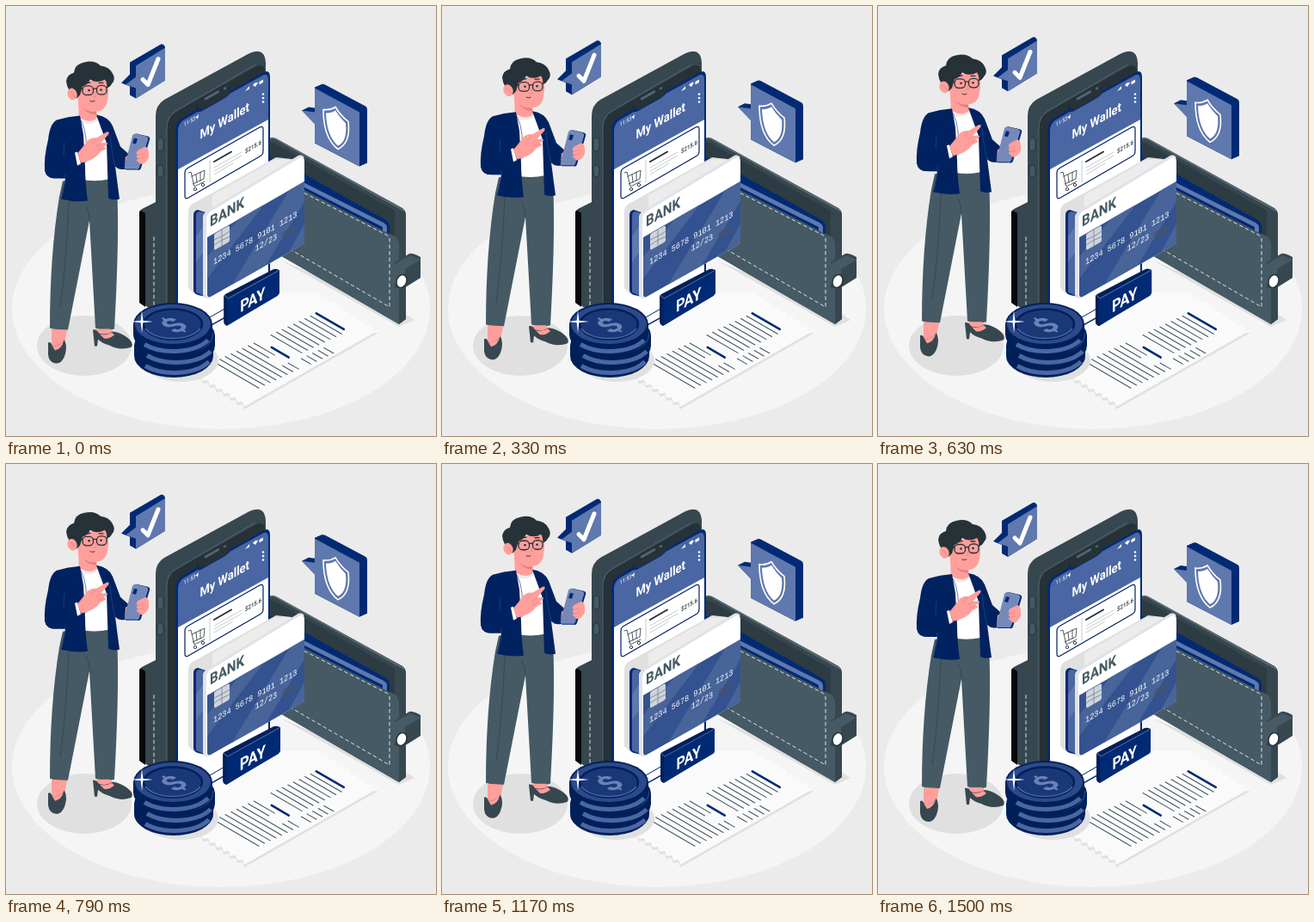
Write an HTML page that moves like this. It is 500 by 500 pixels and loops after 1540 ms.

```html
<!DOCTYPE html>
<html lang="en">
<head>
<meta charset="utf-8">
<title>My Wallet</title>
<style>
html, body { margin: 0; width: 100%; height: 100%; overflow: hidden; background: #ebebeb; }
svg { display: block; width: 100vw; height: 100vh; }
text { font-family: Roboto, sans-serif; font-weight: 700; fill: #fff; }
.mono { font: 9.9px "Liberation Mono", monospace; }
.navy { fill: #012a74; } .deep { fill: #01205a; } .blue { fill: #5f78ae; } .mid { fill: #4a66a3; }
.dark { fill: #263238; } .slate { fill: #37474f; } .steel { fill: #455a64; } .skin { fill: #ff9f9b; }
.white { fill: #fff; } .shade { fill: #e0e0e0; } .jacket { fill: #012260; }
.line { fill: none; stroke: #263238; stroke-linecap: round; stroke-linejoin: round; }
.stitch { fill: none; stroke: #dfe4e6; stroke-dasharray: 4.5 3; }
</style>
</head>
<body>
<svg viewBox="0 0 500 500">
  <defs>
    <clipPath id="cardArt"><path d="M234 269L347 204V273Q347 276 344 278L238 338Q234 340 234 335Z"/></clipPath>
    <g id="coin">
      <path class="deep" d="M-46 0V12A46 25 0 0 0 46 12V0Z"/>
      <path d="M-33 23.500A46 25 0 0 0 41 18.500" fill="none" stroke="#4a66a3" stroke-width="5"/>
      <ellipse rx="46" ry="25" class="deep"/>
      <ellipse rx="44" ry="23" fill="#2c4a8a"/>
    </g>
    <path id="paper" d="M277 466l-2-6-6 1-2-6-6 1-2-6-6 1-2-6-6 1-2-6-6 1-2-6-6 1-2-6-6 1L205 390 306 333 365 333l2.500 6 6-.5 2.500 6 6-.5 2.500 6 6-.5 2.500 6 6-.5 2.500 6 6-.5 2.500 6 6-.5 2.500 6 6-.5 2.500 6 6-.5Z"/>
  </defs>

  <ellipse cx="250" cy="352" rx="243" ry="140" fill="#f5f5f5"/>
  <ellipse class="shade" cx="91" cy="395" rx="55" ry="35"/>
  <path class="shade" d="M320 296L457 373L475 365L460 355Z"/>

  <g id="wallet">
    <path class="slate" d="M155 241Q155 237 160 235L178 226V356L164 350L155 342Z"/>
    <path d="M155 241Q155 236 159 239L162 241V350L155 345Z" fill="#05090b"/>
    <path class="stitch" d="M178 264L172 268V352"/>
    <path class="slate" d="M300 160Q306 151 314 154L461 235Q465 238 465 243V364L457 370L300 279Z"/>
    <path d="M300 163Q308 156 315 161L452 238V275L300 200Z" fill="#2d3b42"/>
    <path d="M304 156Q309 151 316 156L463 238" fill="none" stroke="#5a6d76" stroke-width="1.500"/>
    <path class="navy" d="M300 176L316 178L440 248Q446 251 446 256V272L300 200Z"/>
    <path class="blue" d="M300 182L439 252Q443 254 443 258V266L300 194Z"/>
    <path class="navy" d="M300 187L438 257V264L300 194Z"/>
    <path class="steel" d="M300 190L446 265Q457 268 457 277V370L300 279Z"/>
    <path class="slate" d="M452 239L464 240Q465 241 465 245V364L457 370V274L452 267Z"/>
    <path class="stitch" d="M340 214L442 266Q446 268 446 272V350L315 274"/>
    <path class="slate" d="M452 298L469 288Q473 287 482 292V316L463 328H452Z"/>
    <path class="steel" d="M452 300L470 290L482 295L464 306V318L452 323Z"/>
    <g transform="rotate(20 460 320)">
      <ellipse cx="460" cy="320" rx="6.500" ry="8.500" class="dark"/>
      <ellipse cx="460" cy="320" rx="5" ry="7" class="white"/>
    </g>
  </g>

  <use href="#paper" y="3" class="shade"/>
  <use href="#paper" fill="#fafafa"/>
  <g id="receipt" class="line"></g>

  <g id="phone">
    <path class="slate" d="M174 128Q174 115 184 109L283 55Q301 47 302 66V95L200 380L174 362Z"/>
    <path class="dark" d="M187 142Q187 129 197 123L291 70Q301 66 301 78V330L200 390L187 376Z"/>
    <path d="M187 360V142Q187 128 198 122L290 68" fill="none" stroke="#4c5f69" stroke-width="1.200"/>
    <path d="M176 156q3-6 7 0v10q-4 6-7 0zM176 188q3-6 7 0v8q-4 6-7 0z" fill="#455a64" stroke="#263238"/>
    <path class="navy" d="M197 145Q197 136 204 131L222 120V114L261 92V99L298 78Q307 72 307 83V334L197 395Z"/>
    <path class="white" d="M200 176L305 118V333L200 392Z"/>
    <path fill="#4a66a3" d="M200 146Q200 137 206 133L223 123Q225 124 230 121L253 108Q259 104 260 102L298 81Q305 77 305 86V132L200 190Z"/>
    <path class="dark" d="M222 113L261 91L260 101Q259 104 253 107L230 120Q224 122 223 116Z"/>
    <path d="M232 108L247 99.500M254 96L255 95.500" fill="none" stroke="#53666f" stroke-width="2.600" stroke-linecap="round"/>
    <text transform="matrix(.866 -.5 0 1 206.500 140.500)" font-size="6.500" style="font-weight:400">11:53</text>
    <path class="white" d="M220 130l4-4-1 6-1-2zM278 99l5-6v3.500zM287 92q3-4 6-3l-3 5zM294.500 88l4.500-2.600v3.400l-4.500 2.600z"/>
    <g class="white"><circle cx="299" cy="102.500" r="1.300"/><circle cx="299" cy="107" r="1.300"/><circle cx="299" cy="111.500" r="1.300"/></g>
    <text transform="matrix(.866 -.5 0 1 225.500 155)" font-size="15">My Wallet</text>
    <path d="M208 194Q208 190 212 188L295 141Q299 139 299 143V169Q299 173 295 175L212 223Q208 225 208 221Z" fill="#fff" stroke="#01205e" stroke-width="1.200"/>
    <path class="line" stroke-width=".8" d="M212 194l3-1 4 17 12-6M216 198l15-7-1 10-13 6M221 196l1 9M226 193l0 10"/>
    <g class="line" stroke-width=".9"><circle cx="220" cy="213" r="1.700"/><circle cx="229" cy="208" r="1.700"/></g>
    <path class="line" stroke-width="2" d="M242 181L262 169.500"/>
    <path class="line" stroke-width=".5" opacity=".5" d="M237 180V205M242 188L274 170M242 192L274 174M242 196L264 183"/>
    <text transform="matrix(.866 -.5 0 1 278 171.500)" font-size="7" style="fill:#263238;font-weight:500">$215.6</text>
  </g>

  <path d="M306 275V311M237 362L256 351" fill="none" stroke="#01205e"/>

  <g id="card">
    <path class="shade" d="M212 239Q212 233 217 230L314 176L332 178L230 246V336L217 333L212 328Z"/>
    <path fill="#ececec" d="M240 220L312 179L336 178L240 236Z"/>
    <path class="navy" d="M218 243Q218 238 223 237L232 240V338L223 336Q218 334 218 330Z"/>
    <path class="mid" d="M221 244Q221 239 225 239L230 240V337L221 333Z"/>
    <path class="blue" d="M221 268L230 255V285L221 298Z"/>
    <path fill="#dfe2e6" d="M229 246Q229 241 234 238L338 175Q343 171 347 176L236 242V340Q229 341 229 335Z"/>
    <path d="M233 248Q233 242 238 239L339 178Q347 173 347 181V273Q347 276 344 278L238 338Q233 341 233 335Z" fill="#fff"/>
    <g clip-path="url(#cardArt)">
      <path fill="#34528f" d="M230 200H350V345H230Z"/>
      <path fill="#486499" d="M230 296L290 225L312 215L230 322ZM250 345L335 205L350 200V222L276 345ZM296 345L350 248V268L312 345Z"/>
    </g>
    <text transform="matrix(.866 -.5 0 1 237 257)" font-size="17.500" style="fill:#455a64">BANK</text>
    <path fill="#cfd4da" d="M242 267Q242 265 244 264L258 256Q260 255 260 257V273L258 275L244 283Q242 284 242 282Z"/>
    <path d="M242 272l6-3 6-3 6-4M242 278l6-4 6-3 6-3M251 260v19" fill="none" stroke="#6f7f98" stroke-width=".8"/>
    <text class="mono" transform="matrix(.866 -.5 0 1 241 301)" xml:space="preserve">1234 5678 9101 1213</text>
    <text class="mono" transform="matrix(.866 -.5 0 1 289.500 285.500)">12/23</text>
    <g transform="matrix(.866 -.5 0 1 329 263)" fill="#46546c" opacity=".75"><circle cx="-4.500" r="4.500"/><circle cx="4.500" r="4.500"/></g>
  </g>

  <g id="pay">
    <path class="deep" d="M254 338Q254 336 256 335L310 307Q313 306 317 308V334L258 371Q254 370 254 366Z"/>
    <path class="navy" d="M258 343Q258 340 260 339L314 309Q317 307 317 310V333Q317 336 315 337L261 369Q258 371 258 368Z"/>
    <path d="M255 336.500L259 340L316 308.500" fill="none" stroke="#4a66a3" stroke-width="1"/>
    <text transform="matrix(.866 -.5 0 1 272.500 356)" font-size="18.500">PAY</text>
  </g>

  <g id="coins">
    <ellipse class="shade" cx="203" cy="412" rx="44" ry="25"/>
    <use href="#coin" x="195" y="395"/>
    <use href="#coin" x="197" y="383"/>
    <use href="#coin" x="194" y="370"/>
    <ellipse cx="194" cy="370" rx="34" ry="17.500" fill="#1a3878" stroke="#01205a" stroke-width="2.500"/>
    <path d="M162 375A34 17.500 0 0 0 226 375" fill="none" stroke="#4a66a3" stroke-width="1.500"/>
    <text transform="matrix(.866 -.5 .866 .5 195 371)" y="12" font-size="34" text-anchor="middle" style="fill:#6a82b6">$</text>
    <path class="white" d="M158 354L159.300 365.700L171 367L159.300 368.300L158 380L156.700 368.300L145 367L156.700 365.700Z"/>
  </g>

  <g class="float">
    <path class="steel" d="M66 204L128 200Q133 250 126 376Q115 379 104 375L97 250L72 377Q61 379 51 375Q51 290 62 222Z"/>
    <path d="M97 250Q97 240 93 233M118 210L126 224M73 228Q70 300 63 350" class="line" style="stroke:#37474f"/>
    <path class="skin" d="M53 376L71 377L67 398L53 399ZM105 376L121 376L128 384L120 392L106 388Z"/>
    <path class="slate" d="M49 392Q52 390 54 396Q61 397 68 389Q72 397 68 408Q64 417 58 416Q50 415 49 406ZM101 377Q105 376 108 381Q116 384 124 379Q133 380 141 386Q149 392 146 397Q133 402 120 395Q112 393 107 388L106 396H103Z"/>
    <path class="skin" d="M54 396Q61 397 67 390Q65 399 57 401ZM109 382Q116 384 123 380L126 383Q120 388 114 387Z"/>

    <path class="white" d="M85 132Q98 137 108 130L118 140L119 202Q106 205 92 203Z"/>
    <path class="skin" d="M84 112H104L106 131Q98 140 85 133Z"/>
    <path d="M87 131Q98 138 107 130L108 133Q97 141 85 135Z" fill="#ececec"/>
    <path class="jacket" d="M86 128Q72 129 59 133Q51 137 49 156Q44 176 45 192Q47 201 58 201L69 201L64 225Q80 229 95 227Q92 205 92 188L90 150Z"/>
    <path class="jacket" d="M105 127Q119 129 124 140L133 164L142 172L139 190Q132 192 127 187L132 225Q124 227 119 224L117 160Z"/>
    <path class="line" style="stroke:#2c4785" stroke-width=".7" d="M68 160Q66 176 69 186L69 201M65 223L69 204M121 151Q123 173 127 187M87 133Q96 150 93 182"/>
    <path class="jacket" d="M54 180L81 171L84 186L62 200Q50 203 46 195Z"/>
    <path class="white" d="M80 171L83 170L87 184L83 186Z"/>
    <path class="skin" d="M83 172Q89 165 94 158Q99 153 105 154L117 147Q121 146 119 150L110 160Q119 158 118 161L113 165Q117 164 116 167L110 170Q103 180 87 183Z"/>
    <path class="line" style="stroke:#e87f7e" stroke-width=".7" d="M105 155L99 161M111 160L105 164M113 165L106 168"/>
    <path class="skin" d="M139 176Q143 173 148 179L147 188L138 187Z"/>
    <path class="navy" d="M148 151Q149 149 152 149L165 152Q168 153 167 156L157 189Q156 192 153 191L140 191Q137 190 138 187Z"/>
    <path fill="#7589b9" d="M147 151Q148 149 151 149L163 152Q166 153 165 156L155 188Q154 191 151 190L139 190Q137 189 138 187Z"/>
    <path class="navy" d="M149 154L153 155L151 161L147 160Z"/>
    <path class="skin" d="M154 168L162 164Q167 165 166 177Q161 186 156 184L153 181Q150 180 154 178Q150 176 153 174Q150 171 154 168Z"/>
    <path class="line" style="stroke:#e87f7e" stroke-width=".6" d="M153 174L159 172M154 178L160 177"/>

    <path class="skin" d="M82 92L116 83Q121 96 118 110Q116 123 104 123Q91 123 84 112Z"/>
    <path d="M90 119Q98 125 105 123L105 127Q94 126 90 119Z" fill="#e87f7e"/>
    <path class="dark" d="M82 108Q71 99 70 88Q71 80 79 78Q80 68 91 66Q103 63 110 70Q120 71 124 79Q128 86 123 91Q121 95 117 96Q118 90 115 86Q106 91 98 86Q95 92 89 94L86 104Z"/>
    <ellipse class="skin" cx="77" cy="103" rx="5.500" ry="7" transform="rotate(-20 77 103)"/>
    <path class="line" style="stroke:#e87f7e" stroke-width=".8" d="M75 101Q79 101 80 107M104 101L105 106L102 106.500"/>
    <g class="line" stroke-width="1.300"><rect x="89" y="93.500" width="12.500" height="10.500" rx="4.500"/><rect x="105.500" y="93" width="11.500" height="10.500" rx="4.500"/><path d="M101.500 97Q103.500 96 105.500 97M89 97L82 96M92 90.500L98 89.500M108 90L113 90"/></g>
    <g class="dark"><circle cx="96.500" cy="98.500" r="1.300"/><circle cx="110.500" cy="98" r="1.300"/></g>
    <path class="line" stroke-width=".9" d="M98 111Q101 112.500 103 111"/>
  </g>

  <g class="float">
    <path class="navy" d="M144 66L180 45Q183 44 185 48V87L151 108L144 104V94L134 90L144 80Z"/>
    <path class="blue" d="M151 70L185 49V87L151 108V96L139 92L151 83Z"/>
    <path d="M159 86L165 92L177 62" fill="none" stroke="#fff" stroke-width="5" stroke-linecap="round" stroke-linejoin="round"/>
  </g>

  <g class="float">
    <path class="navy" d="M359 95L367 91.500Q369 91 371 92L418 117Q420 118 420 121V183L411 187L359 160V137L344 122L352 118L359 119Z"/>
    <path class="blue" d="M359 96L411 124V187L359 160V138L344 122L359 124Z"/>
    <path d="M369 121Q377 122 383 118Q389 128 398 135Q401 160 386 167Q369 154 369 121Z" fill="none" stroke="#fff" stroke-width="1.600"/>
    <path class="white" d="M372 125Q379 125 383 122Q388 130 395 137Q397 158 386 163Q373 152 372 125Z"/>
  </g>
</svg>
<script>
const LOOP = 1540, LEAD = 40;
const floats = document.querySelectorAll('.float');
const pay = document.getElementById('pay');

// Receipt rows: [first row, last row, offset along the row, length, stroke width, colour]
const rows = [
  [0, 5, 0, 52, 1.1], [6, 7, 0, 24, 1.1], [10, 17, 0, 36, 1.1],
  [8, 8, 14, 20, 2.6, '#012a74'], [18, 18, 0, 32, 2.6, '#012a74'],
  [9, 13, 42, 11, 1.1], [6, 7, 40, 12, 1.1]
];
document.getElementById('receipt').innerHTML = rows.map(([from, to, shift, length, width, color = '#455a64']) => {
  let d = '';
  for (let i = from; i <= to; i++) {
    d += `M${242 + i * 6.6 + shift} ${414 - i * 3.15 + shift * .58}l${length} ${length * .58}`;
  }
  return `<path d="${d}" style="stroke:${color}" stroke-width="${width}"/>`;
}).join('');

const tent = (p, start, peak, end) =>
  Math.max(0, Math.min((p - start) / (peak - start), (end - p) / (end - peak)));

function draw(now) {
  const p = (now + LEAD) % LOOP / LOOP;
  const lift = -10 * tent(p, 0, .5, 1);
  const scale = 1 + .1 * (tent(p, 0, .1, .3) + tent(p, .4, .5, .6));
  floats.forEach(el => el.setAttribute('transform', `translate(0 ${lift})`));
  pay.setAttribute('transform', `translate(285.5 338.5) scale(${scale}) translate(-285.5 -338.5)`);
  requestAnimationFrame(draw);
}
draw(performance.now());
</script>
</body>
</html>
```
